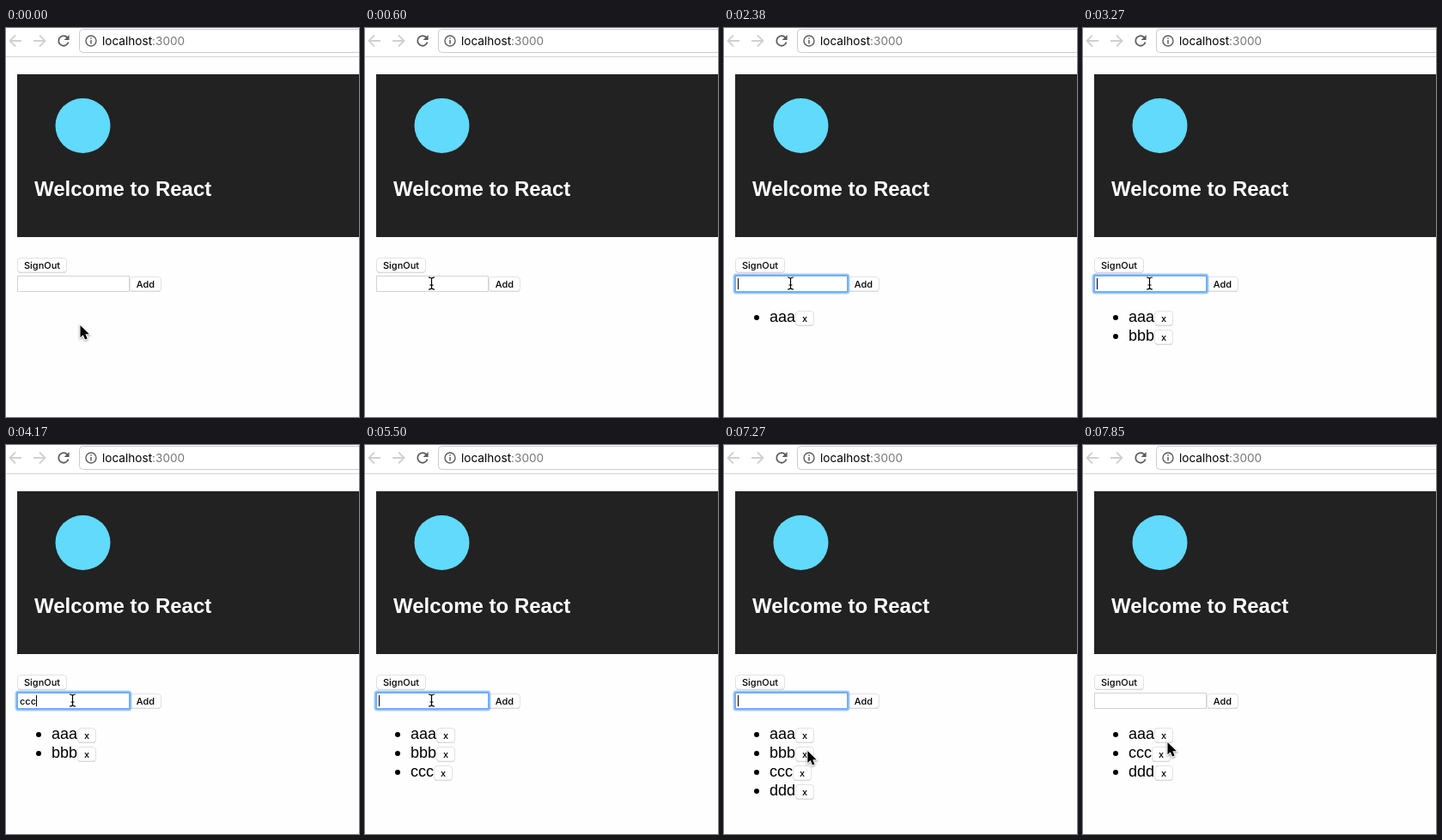
An HTML page for the animation above (8000 ms loop, 411 by 454 pixels).

```html
<!DOCTYPE html>
<html lang="en">
<head>
<meta charset="utf-8">
<title>Todo list</title>
<style>
  html, body { margin: 0; width: 100%; height: 100%; overflow: hidden; background: #fefefe; }
  svg { display: block; width: 411px; height: 454px; }
  text { font: 500 11px Inter, sans-serif; fill: #000; white-space: pre; }
  .title { font: bold 24px "Liberation Sans", Arial, sans-serif; fill: #fff; }
  .url { font-size: 13.6px; font-weight: 400; }
  .item { font: 18px "Liberation Sans", Arial, sans-serif; }
  .line { fill: none; stroke-width: 1.8; }
</style>
</head>
<body>
<svg id="stage" viewBox="0 0 411 454">
  <rect width="411" height="33" fill="#fff"/>
  <path d="M0 33.5H411" stroke="#d4d4d4"/>
  <path class="line" stroke="#d0d0d0" d="M18 15H5M11 8.5L4.5 15L11 21.5M32 15H45M39 8.5L45.5 15L39 21.5"/>
  <path class="line" stroke="#5c5c5c" d="M71.5 11.2A5.8 5.8 0 1 0 72.6 16.5"/>
  <path d="M73.6 8V14H67.6Z" fill="#5c5c5c"/>
  <rect x="85.5" y="1.5" width="340" height="27" rx="4" fill="#fff" stroke="#cbcbcb"/>
  <circle cx="99" cy="15" r="6" fill="none" stroke="#5c5c5c" stroke-width="1.4"/>
  <path d="M99 14V18.5M99 11.2V12.8" stroke="#5c5c5c" stroke-width="1.5"/>
  <text class="url" x="112" y="20">localhost<tspan fill="#777">:3000</tspan></text>

  <rect x="13" y="54" width="398" height="190" fill="#222"/>
  <circle cx="89.5" cy="114" r="32" fill="#61dafb"/>
  <text class="title" x="33" y="196">Welcome to React</text>

  <g id="buttons"></g>
  <rect x="13.5" y="289.5" width="130" height="18" fill="#fff" stroke="#d2d2d2"/>
  <g id="ring" fill="none">
    <rect x="12" y="288" width="133" height="21" rx="2.5" stroke="#a3cbfa" stroke-width="3"/>
    <rect x="13" y="289" width="131" height="19" rx="1.5" stroke="#72aef6" stroke-width="2"/>
  </g>
  <text id="field" x="16" y="303"></text>
  <rect id="caret" y="292" width="1" height="13"/>
  <g id="list"></g>

  <path id="arrow" d="M0 0V14.2L3.3 11.2L5.6 16.6L8.2 15.5L5.9 10.3H10.4Z"
        stroke="#fff" stroke-width="2" paint-order="stroke" style="filter: drop-shadow(0 1px 1px #0006)"/>
  <path id="beam" d="M-3.5 -7Q0 -7 0 -5Q0 -7 3.5 -7M0 -5V5M-3.5 7Q0 7 0 5Q0 7 3.5 7M-2 2H2"
        fill="none" stroke="#000" stroke-width="1.2"/>
</svg>
<script>
const LOOP = 8000, HOLD = 148.2, FOCUS = 800, BLUR = 7380, DELETE = 7500;
const $ = id => document.getElementById(id);

// Each word: times of its three keystrokes, then the time it joins the list.
const words = [
  ['aaa', 1180, 1480, 1630, 2080],
  ['bbb', 2530, 2680, 2980, 3270],
  ['ccc', 3720, 3870, 4020, 4320],
  ['ddd', 5650, 5800, 5950, 6250]
];
const cursorPath = [
  [0, 86.5, 347], [150, 86.5, 347], [600, 77.5, 298], [6600, 77.5, 298],
  [6830, 141, 325], [7130, 106, 354], [7280, 97, 357], [7560, 97, 357], [7850, 98.5, 347]
];

const button = (x, y, w, label) => `
  <rect x="${x + .5}" y="${y + 1}" width="${w - 1}" height="17" rx="3.5" fill="#d0d0d0"/>
  <rect x="${x + .5}" y="${y + .5}" width="${w - 1}" height="16.5" rx="3.5" fill="#fff" stroke="#e2e2e2"/>
  <text x="${x + w / 2}" y="${y + 13}" text-anchor="middle">${label}</text>`;

$('buttons').innerHTML = button(13, 268, 58, 'SignOut') + button(144, 290, 37, 'Add');

const rows = words.map(([word]) => {
  const row = document.createElementNS('http://www.w3.org/2000/svg', 'g');
  row.innerHTML = `<circle cx="38" cy="338" r="3"/><text class="item" x="53" y="343">${word}</text>`
    + button(word === 'ccc' ? 80 : 83, 330, 22, 'x');
  return $('list').appendChild(row);
});

const show = (el, on) => el.setAttribute('visibility', on ? 'visible' : 'hidden');
const place = (el, x, y) => el.setAttribute('transform', `translate(${x} ${y})`);

function cursorAt(t) {
  const i = cursorPath.findIndex(p => p[0] > t);
  if (i < 0) return cursorPath.at(-1).slice(1);
  const [t0, x0, y0] = cursorPath[i - 1], [t1, x1, y1] = cursorPath[i];
  const k = (t - t0) / (t1 - t0), e = k * k * (3 - 2 * k);
  return [x0 + (x1 - x0) * e, y0 + (y1 - y0) * e];
}

function draw(t) {
  let typed = '', lastEdit = FOCUS, line = 0;
  words.forEach(([word, ...times], i) => {
    const done = times.filter(time => time <= t);
    if (done.length) lastEdit = done.at(-1);
    if (done.length < 4) typed += word.slice(0, done.length);
    const listed = done.length === 4 && !(word === 'bbb' && t >= DELETE);
    show(rows[i], listed);
    if (listed) place(rows[i], 0, 22 * line++);
  });

  const focused = t >= FOCUS && t < BLUR;
  $('field').textContent = typed;
  $('caret').setAttribute('x', Math.round(16 + (typed ? $('field').getComputedTextLength() : 0)));
  show($('ring'), focused);
  show($('caret'), focused && (t - lastEdit) % 1000 < 500);

  const [x, y] = cursorAt(Math.floor((t + 8) / HOLD) * HOLD);
  const overField = x < 144 && y > 288 && y < 309;
  show($('beam'), overField);
  show($('arrow'), !overField);
  place($('beam'), x, y);
  place($('arrow'), x, y);
}

const start = performance.now();
function tick() {
  draw((performance.now() - start) % LOOP);
  requestAnimationFrame(tick);
}
tick();
</script>
</body>
</html>
```
